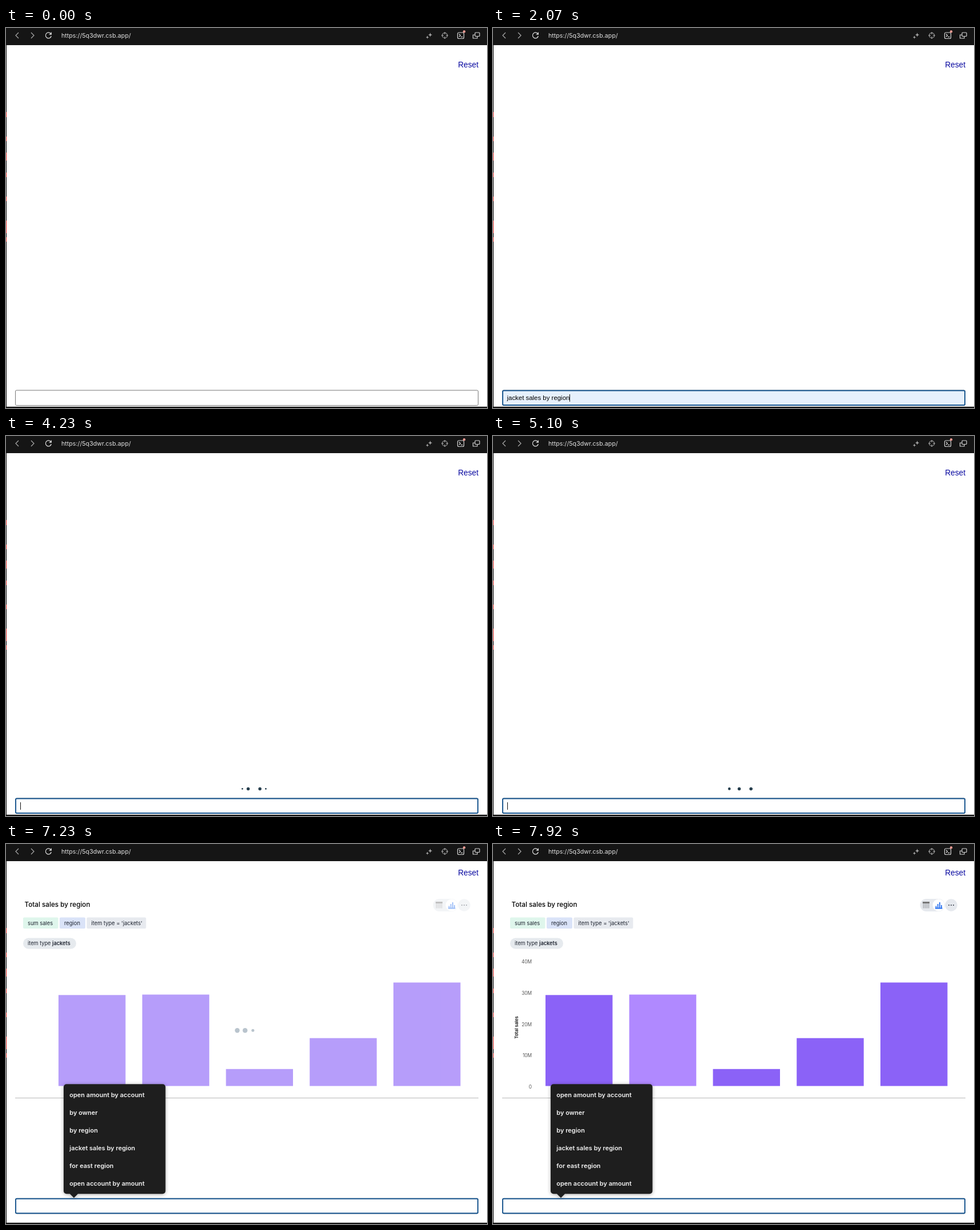
An HTML page for the animation above (8 s loop, 843 by 665 pixels).

```html
<!DOCTYPE html>
<html lang="en">
<head>
<meta charset="utf-8">
<style>
html, body { margin: 0; width: 100%; height: 100%; overflow: hidden; background: #fff; }
svg { display: block; width: 843px; height: 665px; font-family: Inter, sans-serif; }
.icon { fill: none; stroke: #a9a9a9; stroke-width: 1.2; }
.arial { font-family: "Liberation Sans", Arial, sans-serif; }
</style>
</head>
<body>
<svg viewBox="0 0 843 665">
  <rect width="843" height="30" fill="#151515"/>
  <g class="icon">
    <path d="M22 8l-5 5 5 5M44 8l5 5-5 5"/>
    <path d="M78.6 10.2A5 5 0 1 0 79.3 14M79.3 7.5v3.6h-3.6" stroke="#e4e4e4"/>
    <path d="M743.5 8.3l1 2.6 2.6 1-2.6 1-1 2.6-1-2.6-2.6-1 2.6-1zM738.5 13.500l.8 1.900 1.900.8-1.900.8-.8 1.900-.8-1.900-1.900-.8 1.900-.8z" fill="#a9a9a9" stroke="none"/>
    <circle cx="769" cy="13" r="4.500"/>
    <path d="M769 7v4M769 15v4M763 13h4M771 13h4"/>
    <g stroke="#d6d6d6">
      <rect x="791.500" y="8" width="11" height="10.500" rx="2"/>
      <path d="M794 10.500l2.500 2.500-2.500 2.500M797 15.700h3.500"/>
      <rect x="822" y="8" width="8" height="6.500" rx="1"/>
      <path d="M822 12h-3.500v6h7.500v-3.500"/>
    </g>
  </g>
  <circle cx="803" cy="6.300" r="2.200" fill="#f09a92"/>
  <text x="97" y="17" font-size="10.700" fill="#e2e2e2">https://5q3dwr.csb.app/</text>
  <path d="M.5 30V665M0 663.700H843" stroke="#111" stroke-width="1"/>
  <path d="M0 664H843" stroke="#111" stroke-width="2.600"/>
  <path d="M.5 147v9M.5 190v8M.5 218v14M.5 253v8M.5 295v8M.5 337v22M.5 366v8" stroke="#e5322d"/>

  <g id="card">
    <path d="M16 444.500H828" stroke="#b8b8b8"/>
    <g id="heading" fill="#1d232f">
      <text x="32.500" y="110" font-size="11.700" font-weight="500" fill="#000">Total sales by region</text>
      <g font-size="9.400">
        <rect x="30" y="128.500" width="61.500" height="19.500" rx="2" fill="#dff6ec"/>
        <text x="38" y="141.500">sum sales</text>
        <rect x="94" y="128.500" width="45" height="19.500" rx="2" fill="#dae3f8"/>
        <text x="102" y="141.500">region</text>
        <rect x="141.500" y="128.500" width="104" height="19.500" rx="2" fill="#e7eaef"/>
        <text x="149.500" y="141.500">item type = 'jackets'</text>
        <rect x="30" y="164.500" width="93" height="19" rx="9.500" fill="#e6eaee"/>
        <text x="38" y="177" font-size="9.200">item type <tspan font-weight="600">jackets</tspan></text>
      </g>
    </g>
    <g id="tools">
      <rect x="748.500" y="96" width="43.500" height="22" rx="11" fill="#e6e9ee"/>
      <circle cx="781" cy="107" r="10.500" fill="#fff"/>
      <path d="M753 102.500h12" stroke="#777" stroke-width="3"/>
      <path d="M754.500 104v8.500M757.500 104v8.500M760.500 104v8.500M763.500 104v8.500" stroke="#b4b7bc" stroke-width="2"/>
      <path d="M776.500 112v-3.500M779.700 112v-7M782.900 112v-10M786 112v-5M775 112.500h12.500" stroke="#2770ef" stroke-width="1.800"/>
      <circle cx="803" cy="107" r="10.700" fill="#e6e9ee"/>
      <path d="M799 107h0M803 107h0M807 107h0" stroke="#333a47" stroke-width="2" stroke-linecap="round"/>
    </g>
    <g id="bars"></g>
    <g id="axis" fill="#555" font-size="8.300" text-anchor="end">
      <text transform="translate(44 321) rotate(-90)" text-anchor="middle" font-size="7.700" font-weight="600" fill="#111">Total sales</text>
    </g>
    <g id="pulse" fill="#b9c4cd"></g>
  </g>

  <g id="page">
    <text class="arial" x="828" y="69" text-anchor="end" font-size="13.710" fill="#0808a0">Reset</text>
    <rect id="field" x="16.500" y="634" width="811" height="26.500" rx="2" stroke="#777"/>
    <rect id="ring" x="17" y="634.500" width="810" height="25.500" rx="2" fill="none" stroke="#185690" stroke-width="1.900"/>
    <text id="typed" class="arial" x="24.500" y="651.300" font-size="11.430"></text>
    <path id="caret" stroke="#111"/>
    <g id="popup">
      <path d="M106 434H274.500a5 5 0 0 1 5 5V621a5 5 0 0 1-5 5H126l-7 7-7-7H106a5 5 0 0 1-5-5V439a5 5 0 0 1 5-5z" fill="#1e1e1e" style="filter:drop-shadow(0 1px 3px #0005)"/>
      <rect id="hover" x="104" width="172" height="30.800" rx="4" fill="#414141"/>
      <g id="items" fill="#f2f2f2" font-size="11" font-weight="600"></g>
    </g>
  </g>
  <g id="ellipsis" fill="#263e4d"></g>
</svg>
<script>
const LOOP = 8000, BASE = 423.5, ROW = 30.85;
const SUGGESTIONS = ['open amount by account', 'by owner', 'by region', 'jacket sales by region',
  'for east region', 'open account by amount'];
const HEIGHTS = [159.2, 160, 29.7, 83.8, 181.1];

const $ = id => document.getElementById(id);
const set = (el, attrs) => { for (const k in attrs) el.setAttribute(k, attrs[k]); };
const add = (parent, tag, attrs, text = '') => {
  const el = document.createElementNS('http://www.w3.org/2000/svg', tag);
  set(el, attrs);
  el.textContent = text;
  return parent.appendChild(el);
};
const show = (id, on) => set($(id), { opacity: +on });
const ramp = (t, from, to) => Math.min(1, Math.max(0, (t - from) / (to - from)));
const mix = (a, b, k) => a + (b - a) * k;
const wrap = v => v - Math.floor(v);

// CSS-style cubic-bezier timing, solved by bisection
function bezier(x1, y1, x2, y2) {
  const curve = (a, b, u) => 3 * (1 - u) ** 2 * u * a + 3 * (1 - u) * u * u * b + u ** 3;
  return x => {
    let lo = 0, hi = 1;
    for (let i = 0; i < 24; i++) {
      const mid = (lo + hi) / 2;
      if (curve(x1, x2, mid) < x) lo = mid; else hi = mid;
    }
    return curve(y1, y2, lo);
  };
}
const slide = bezier(0, 1, 1, 0);
const beat = bezier(.2, .68, .18, 1.08);
const easeOut = bezier(0, 0, .3, 1);

SUGGESTIONS.forEach((s, i) => add($('items'), 'text', { x: 111.3, y: 457 + i * ROW }, s));
['40M', '30M', '20M', '10M', '0'].forEach((s, i) => add($('axis'), 'text', { x: 68, y: 209.3 + i * 54.6 }, s));
const bars = HEIGHTS.map((h, i) => add($('bars'), 'rect', { x: 92 + i * 146.75, width: 117.5 }));
const pulseDots = [0, 1, 2].map(i => add($('pulse'), 'circle', { cx: 405.3 + i * 13.7 }));
const ellipsisDots = [0, 1, 2, 3].map(() => add($('ellipsis'), 'circle', { cy: 617.4 }));

function drawEllipsis(t) {
  const k = slide(wrap((t - 5100) / 540 + .988));
  const x = [0, k, 1 + k, 2], size = [k, 1, 1, 1 - k];
  ellipsisDots.forEach((dot, i) => set(dot, { cx: 414.2 + 20.57 * x[i], r: 2.75 * size[i] }));
}

function drawPulse(t, y) {
  pulseDots.forEach((dot, i) => {
    const p = wrap((t - 5970) / 852 + .485 - i * .23);
    const size = p < .45 ? mix(1, .1, beat(p / .45)) : mix(.1, 1, beat(ramp(p, .45, .8)));
    set(dot, { cy: y, r: 4.2 * Math.max(0, size) });
  });
}

function draw(t) {
  const loaded = t >= 5400, titled = t >= 6420, ready = t >= 7320;
  const preview = t >= 1320 && t < 2520;
  const pick = t < 1320 ? -1 : t < 1620 ? 1 : t < 1710 ? 2 : 3;

  set($('page'), { transform: `translate(0 ${loaded ? -13.7 : 0})` });
  show('ring', ramp(t, 390, 480));
  set($('field'), { fill: preview ? '#e6f0fc' : '#fff' });
  $('typed').textContent = preview ? SUGGESTIONS[pick] : '';

  const accepted = t >= 2070 && t < 2520;
  const blink = t > 420 && t < 6750 && wrap((t - 400) / 900) < .5;
  set($('caret'), { d: `M${accepted ? 134.5 : 25.5} 641v13` });
  show('caret', accepted || blink && !preview);

  const first = ramp(t, 810, 900) * (1 - ramp(t, 2040, 2070));
  show('popup', t < 2100 ? first : ramp(t, 6570, 6630));
  show('hover', pick > 0 && t < 2100);
  set($('hover'), { y: 437.7 + pick * ROW });

  show('ellipsis', t >= 2520 && !loaded);
  drawEllipsis(t);

  show('card', loaded);
  show('heading', titled);
  show('tools', !titled ? 0 : ready ? 1 : .45);
  show('pulse', !ready);
  drawPulse(t, titled ? 326.3 : 251);

  const grow = easeOut(ramp(t, 6700, 7150));
  show('bars', mix(.62, 1, ramp(t, 7320, 7500)));
  show('axis', ramp(t, 7380, 7560));
  bars.forEach((bar, i) => {
    const h = HEIGHTS[i] * grow, lit = i === 1 ? ramp(t, 7620, 7740) : 0;
    const rgb = [mix(139, 176, lit), mix(98, 137, lit), mix(247, 255, lit)];
    set(bar, { y: BASE - h, height: h, fill: `rgb(${rgb.map(Math.round)})` });
  });
}

function tick() {
  draw(performance.now() % LOOP);
  requestAnimationFrame(tick);
}
tick();
</script>
</body>
</html>
```
